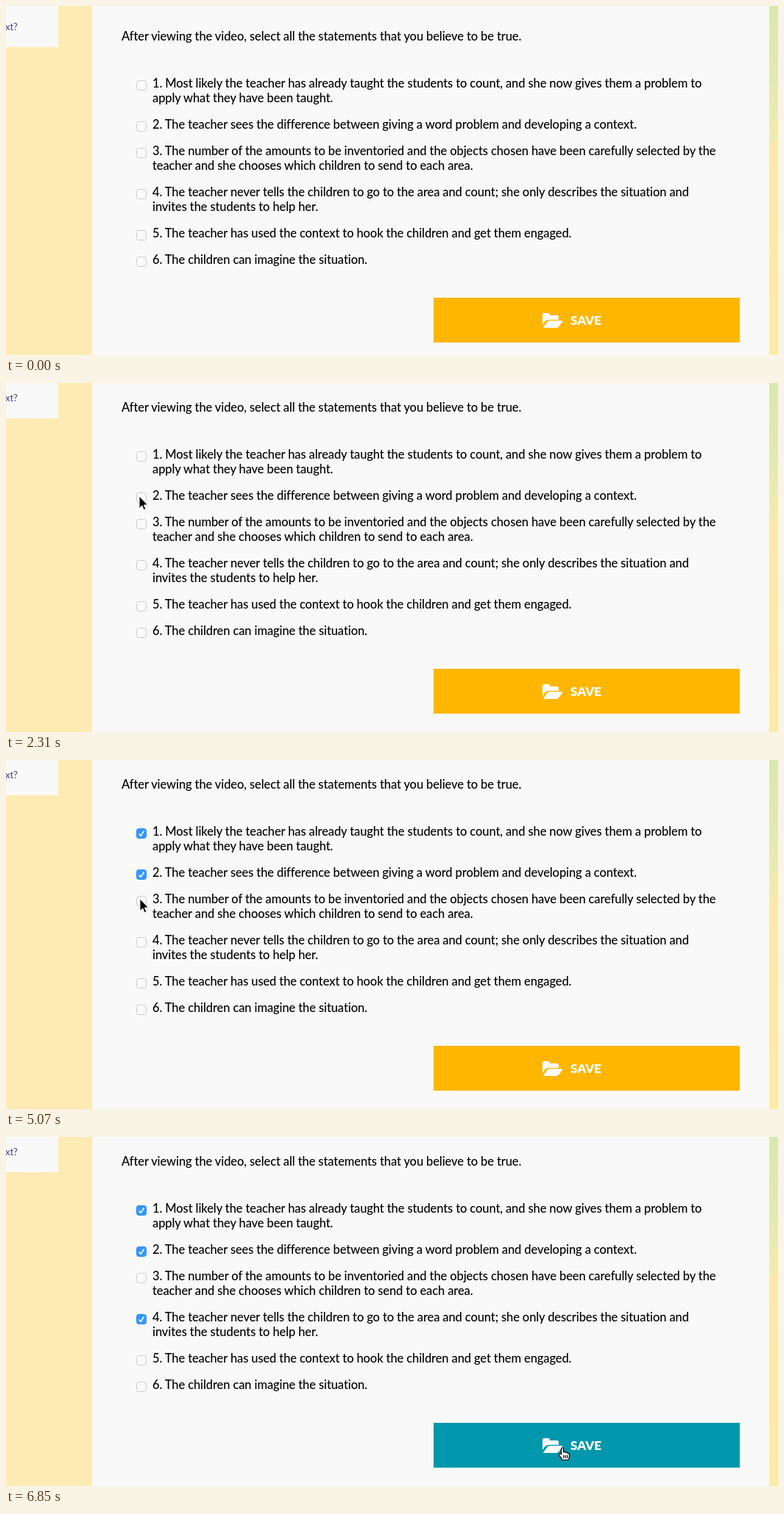
These frames come from a looping animation (1049x475 px, 8000 ms). An HTML page:

```html
<!DOCTYPE html>
<html lang="en">
<head>
<meta charset="utf-8">
<title>Statement quiz</title>
<style>
html, body { margin: 0; width: 100%; height: 100%; overflow: hidden; background: #feeab3; }
svg { display: block; }
text { font: 500 16.5px Lato, sans-serif; letter-spacing: -.11px; fill: #000; }
.tab { font-size: 13px; fill: #51518a; }
.save { font-weight: 900; font-size: 17px; letter-spacing: 0; fill: #fff; }
</style>
</head>
<body>
<svg id="stage" width="1049" height="475" viewBox="0 0 1049 475">
  <defs>
    <linearGradient id="edge" x2="0" y2="1">
      <stop offset="0" stop-color="#d8e8ac"/>
      <stop offset=".2" stop-color="#e2eab0"/>
      <stop offset=".38" stop-color="#eeebb2"/>
      <stop offset=".4" stop-color="#fce8a8"/>
      <stop offset="1" stop-color="#fdeaa6"/>
    </linearGradient>
  </defs>
  <rect x="1037" width="12" height="475" fill="url(#edge)"/>
  <rect x="117" width="920" height="475" fill="#f9f9f9"/>
  <g id="page">
    <rect y="-10" width="71" height="58" fill="#f9f9f9"/>
    <text class="tab" x="-1" y="25">xt?</text>
    <text x="157" y="39">After viewing the video, select all the statements that you believe to be true.</text>
    <g id="list"></g>
    <rect id="button" x="581" y="389" width="416" height="61"/>
    <g fill="#fff">
      <path d="M729 426V412q0-2 2-2h6q2 0 2 2v1h10q2 0 2 2v4H737q-3 0-5 2.500z"/>
      <path d="M730 429.500l5.500-7.500q1.200-1.700 3-1.700H755q2 0 1 1.700l-5 6.500q-1.200 1.500-3 1.500H731q-1.500 0-1-.5z"/>
    </g>
    <text class="save" x="767" y="426">SAVE</text>
  </g>
  <path id="arrow" d="M0 0V16.500L3.800 13L6.300 18.800L9 17.600L6.500 12H11.500z" fill="#000" stroke="#fff" stroke-width="1"/>
  <g id="hand" fill="#fff" stroke="#000" stroke-width="1.200" stroke-linejoin="round">
    <path d="M-1.500 9V1.500Q-1.500 0 0 0T1.500 1.500V6Q3.500 4.500 4.500 6.500Q6.500 5.500 7.200 7.500Q9.500 7 9.500 9.500V12Q9.500 14 8 16.500H0Q-1.500 13.500-4 11Q-5.500 9-4 8.200T-1.500 9z"/>
    <path d="M1.700 10v4M4.200 10v4M6.700 10v4" fill="none"/>
  </g>
</svg>
<script>
const LOOP = 8000, STEP = 90;
const $ = id => document.getElementById(id);
const items = [
  [97, "1. Most likely the teacher has already taught the students to count, and she now gives them a problem to", "apply what they have been taught."],
  [153, "2. The teacher sees the difference between giving a word problem and developing a context."],
  [189, "3. The number of the amounts to be inventoried and the objects chosen have been carefully selected by the", "teacher and she chooses which children to send to each area."],
  [245, "4. The teacher never tells the children to go to the area and count; she only describes the situation and", "invites the students to help her."],
  [301, "5. The teacher has used the context to hook the children and get them engaged."],
  [337, "6. The children can imagine the situation."]
];
$("list").innerHTML = items.map(([y, ...lines]) =>
  `<rect x="177.500" y="${y - 3.5}" width="13" height="13" rx="3"/>
  <path d="M180.700 ${y + 3.500}l2.400 2.800l4.400-6.800" fill="none" stroke="#fff" stroke-width="1.500"/>` +
  lines.map((s, i) => `<text x="199" y="${y + 6 + i * 20}">${s}</text>`).join("")).join("");
const boxes = [...document.querySelectorAll("#list rect")];
const ticks = [...document.querySelectorAll("#list path")];

// item index: [pressed at, checked at]
const clicks = { 0: [3730, 3820], 1: [4720, 4800], 3: [5410, 5500] };

// pointer moves: start, end, x, y
const moves = [
  [870, 870, 247, 250], [990, 990, 243, 242], [1260, 1690, 183, 104],
  [1960, 2310, 181, 148], [2310, 2490, 181, 170], [2490, 2750, 183, 100],
  [3010, 3010, 182, 95], [4000, 4450, 182, 177], [4450, 4720, 182, 150],
  [4890, 5410, 182, 245], [5680, 5680, 180, 252],
  [6040, 6220, 225, 268], [6490, 6850, 756, 423]
];

// The pointer advances in steps, easing through each move.
function pointer(t) {
  let x = 247, y = 250;
  for (const [from, to, nx, ny] of moves) {
    if (t < from) break;
    const s = from + Math.floor((t - from) / STEP + 1) * STEP;
    const k = t >= to ? 1 : Math.min(1, (s - from) / (to - from + STEP));
    const e = k * k * (3 - 2 * k);
    x += (nx - x) * e;
    y += (ny - y) * e;
  }
  return [Math.round(x), Math.round(y)];
}

function draw(now) {
  const t = now % LOOP, [x, y] = pointer(t);
  const over = x > 581 && x < 997 && y > 389 && y < 450;
  $("page").setAttribute("transform", `translate(0 ${t < 120 ? 8 : 0})`);
  $("button").setAttribute("fill", over ? "#0097ac" : "#ffb600");
  boxes.forEach((box, i) => {
    const [press, check] = clicks[i] || [LOOP, LOOP];
    const on = t >= check, down = t >= press && !on;
    box.setAttribute("fill", on ? "#3797fb" : down ? "#d8d8d8" : "#fafafa");
    box.setAttribute("stroke", on ? "#2f8df5" : down ? "#a0a0a0" : "#cccccc");
    ticks[i].setAttribute("visibility", on ? "visible" : "hidden");
  });
  for (const id of ["arrow", "hand"]) {
    $(id).setAttribute("transform", `translate(${x} ${y})`);
    $(id).setAttribute("visibility", t >= 870 && over === (id === "hand") ? "visible" : "hidden");
  }
  requestAnimationFrame(draw);
}
requestAnimationFrame(draw);
</script>
</body>
</html>
```
